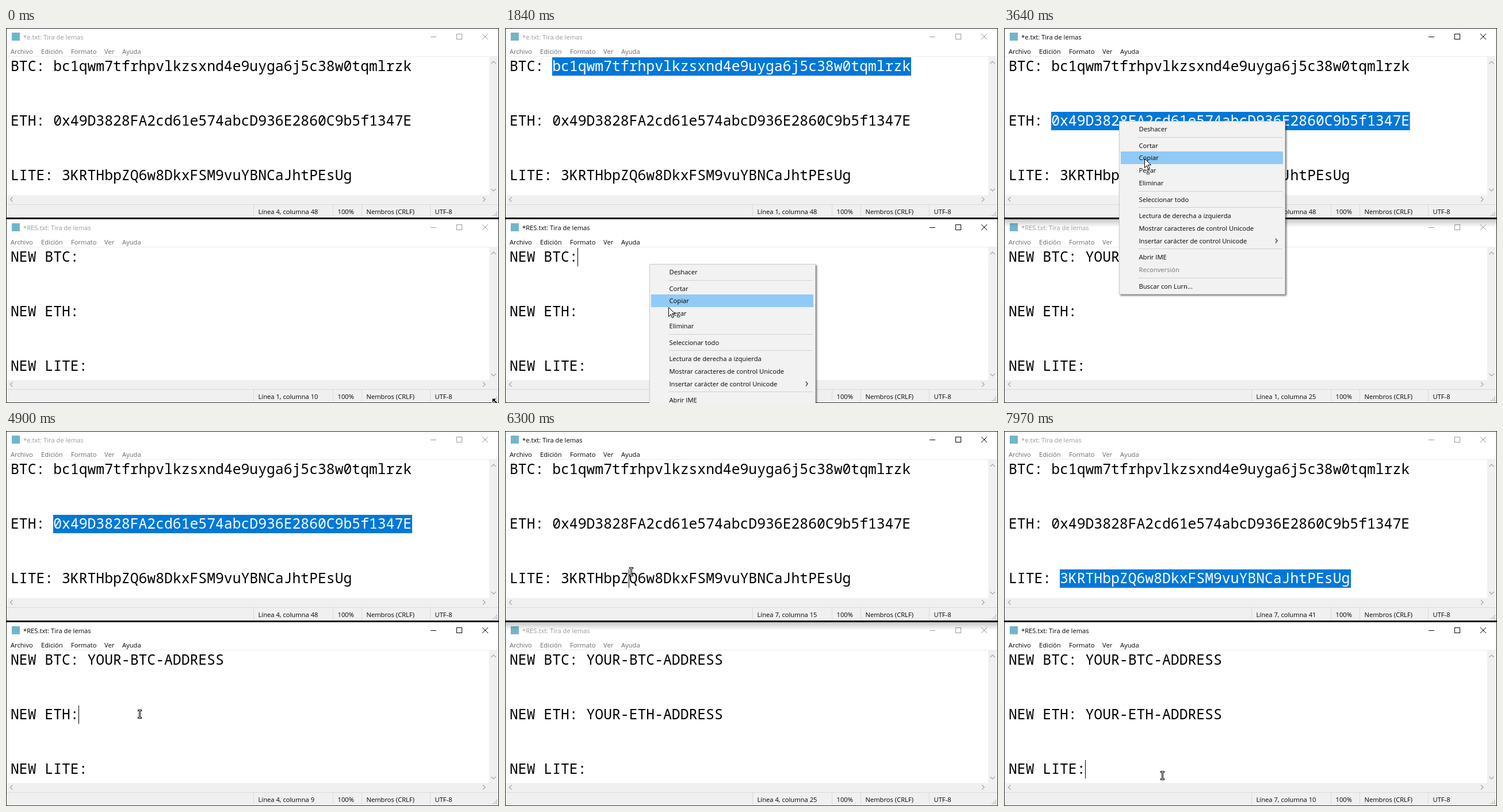
Animation of 857x653 px, one loop 8000 ms. Source, as an HTML page with a canvas:

```html
<!DOCTYPE html>
<html lang="es">
<head>
<meta charset="utf-8">
<style>
html, body { margin: 0; width: 100%; height: 100%; overflow: hidden; background: #fff; }
canvas { display: block; }
</style>
</head>
<body>
<canvas id="stage" width="857" height="653"></canvas>
<script>
const c = document.getElementById('stage').getContext('2d');
const UI = '11.2px "Open Sans", "Noto Sans", sans-serif';
const MONO = '24.73px "Noto Sans Mono", "DejaVu Sans Mono", monospace';
const APP = 'Tira de lemas';
const PITCH = 14.84, LINE = 95 / 3, ROW = 21.7, GAP = 7;
const LOOP = 8000, START = 500;

// One copy-and-paste round per coin: times of its four clicks,
// and where the pointer clicks above, clicks below and opens the paste menu
const rounds = [
  { coin: 'BTC', address: 'bc1qwm7tfrhpvlkzsxnd4e9uyga6j5c38w0tqmlrzk',
    pick: 100, copy: 500, drop: 1170, paste: 2100, from: [176, 67], to: [179, 411], menu: [252, 411] },
  { coin: 'ETH', address: '0x49D3828FA2cd61e574abcD936E2860C9b5f1347E',
    pick: 2570, copy: 3840, drop: 4640, paste: 5700, from: [201, 162], to: [232, 504], menu: [232, 493] },
  { coin: 'LITE', address: '3KRTHbpZQ6w8DkxFSM9vuYBNCaJhtPEsUg',
    pick: 6240, copy: 7240, drop: 7900, paste: 8900, from: [219, 245], to: [275, 600], menu: [275, 600] }
];
const SELECT = 200, OPEN = 400; // delays after a click

const groups = [
  ['Deshacer'],
  ['Cortar', 'Copiar', 'Pegar', 'Eliminar'],
  ['Seleccionar todo'],
  ['Lectura de derecha a izquierda', 'Mostrar caracteres de control Unicode', 'Insertar carácter de control Unicode'],
  ['Abrir IME', 'Reconversión'],
  ['Buscar con Lurn...']
];

const shift = ([x, y], dx, dy) => [x + dx, y + dy];

// Pointer path: click, wait, hover the menu item, travel on
const path = rounds.flatMap(r => {
  const copyItem = shift(r.from, 43, 65), pasteItem = shift(r.menu, 37, 86);
  return [
    [r.pick, r.from], [r.pick + OPEN, r.from],
    [Math.min(r.pick + OPEN + 350, r.copy), copyItem], [r.copy, copyItem],
    [r.drop - 200, r.to], [r.drop, r.to],
    [r.drop + 200, r.menu], [r.drop + OPEN, r.menu],
    [r.drop + OPEN + 350, pasteItem], [r.paste, pasteItem]
  ];
});

function pointerAt(t) {
  const i = path.findIndex(k => k[0] > t);
  const [t0, a] = path[i - 1], [t1, b] = path[i];
  const p = (t - t0) / (t1 - t0), e = p * p * (3 - 2 * p);
  return a.map((v, k) => v + (b[k] - v) * e);
}

function stateAt(t) {
  const i = rounds.findLastIndex(r => t >= r.pick), r = rounds[Math.max(i, 0)];
  if (t < START) return { focus: -1, sel: -1, done: 0, top: [4, 48], low: [1, 10] };
  const dropped = t >= r.drop, chosen = t >= r.pick + SELECT, pasted = t >= r.paste;
  const lowIndex = dropped ? i : Math.max(i - 1, 0), lowDone = dropped ? pasted : i > 0;
  const topCol = chosen ? r.coin.length + 2 + r.address.length : Math.round((r.from[0] - 8) / PITCH);
  const lowCol = rounds[lowIndex].coin.length + 6 + (lowDone ? rounds[lowIndex].coin.length + 13 : 0);
  const menu = t >= r.pick + OPEN && t < r.copy ? { at: r.from, age: t - r.pick - OPEN }
    : t >= r.drop + OPEN && t < r.paste ? { at: r.menu, age: t - r.drop - OPEN } : null;
  return {
    focus: dropped ? 1 : 0, sel: chosen ? i : -1, done: i + pasted, menu,
    top: [1 + 3 * i, topCol + 1], low: [1 + 3 * lowIndex, lowCol + 1 - 1],
    caret: dropped || t < r.copy
  };
}

function rect(x, y, w, h, color) {
  c.fillStyle = color;
  c.fillRect(x, y, w, h);
}

function text(s, x, y, color, font = UI) {
  c.font = font;
  c.fillStyle = color;
  c.fillText(s, x, y);
}

function line(points, color, width = 1) {
  c.beginPath();
  points.forEach(([x, y]) => c.lineTo(x, y));
  c.strokeStyle = color;
  c.lineWidth = width;
  c.stroke();
}

function shape(points, fill, stroke) {
  c.beginPath();
  points.forEach(([x, y]) => c.lineTo(x, y));
  c.closePath();
  c.fillStyle = fill;
  c.strokeStyle = stroke;
  c.lineWidth = 1;
  c.fill();
  c.stroke();
}

function chevron(x, y, dx, dy, color = '#a3a3a3', s = 2) {
  line([[x - s * dx - 4 * dy, y - s * dy - 4 * dx], [x + s * dx, y + s * dy],
        [x - s * dx + 4 * dy, y - s * dy + 4 * dx]], color, 1.2);
}

function drawFrame(y, bottom, name, on, [row, col]) {
  const ink = on ? '#000' : '#999';
  rect(10, y + 8, 14, 14, '#72b5c9');
  text(`*${name}.txt: ${APP}`, 30, y + 20, ink);
  let x = 8;
  for (const s of ['Archivo', 'Edición', 'Formato', 'Ver', 'Ayuda']) {
    text(s, x, y + 45, on ? '#000' : '#6a6a6a');
    x += Math.round(c.measureText(s).width) + 14;
  }
  line([[738, y + 15.5], [748, y + 15.5]], ink);
  c.strokeRect(783.5, y + 10.5, 9, 9);
  line([[828, y + 10], [838, y + 20]], ink);
  line([[838, y + 10], [828, y + 20]], ink);

  rect(1, y + 49, 855, 1, '#ececec');
  rect(840, y + 50, 16, bottom - y - 50, '#f0f0f0');
  rect(1, bottom, 855, 38, '#f0f0f0');
  rect(1, bottom + 16, 855, 1, '#d9d9d9');
  chevron(847.5, y + 60, 0, -1);
  chevron(847.5, bottom - 9, 0, 1);
  chevron(9.5, bottom + 7.5, -1, 0);
  chevron(831, bottom + 7.5, 1, 0);

  const cells = [[430, `Línea ${row}, columna ${col}`], [568, '100%'], [618, 'Nembros (CRLF)'], [737, 'UTF-8']];
  for (const [left, s] of cells) {
    rect(left, bottom + 17, 1, 21, '#d9d9d9');
    text(s, left + 8.5, bottom + 33, '#000');
  }
  for (let i = 0; i < 3; i++)
    for (let j = 0; j <= i; j++) rect(852 - 3 * j, bottom + 29 + 3 * i, 2, 2, '#bfbfbf');
}

function drawCaret(y, [row, col], color) {
  rect(Math.floor(8 + (col - 1) * PITCH), Math.round(y + 51 + (row - 1) * LINE), 1, 32, color);
}

function drawMenu({ at: [mx, my], age }, pointerY) {
  c.save();
  c.globalAlpha = Math.min(1, 0.3 + age / 150);
  c.translate(mx - 1, my);
  c.save();
  c.shadowColor = 'rgba(0,0,0,.55)';
  c.shadowBlur = 3;
  c.shadowOffsetX = c.shadowOffsetY = 2;
  rect(0, 0, 289, 302, '#ccc');
  c.restore();
  rect(1, 1, 287, 300, '#f2f2f2');
  let y = 3;
  groups.forEach((labels, i) => {
    if (i) {
      rect(33, Math.round(y + GAP / 2 - .5), 251, 1, '#d0d0d0');
      y += GAP;
    }
    for (const label of labels) {
      const over = pointerY - my;
      if (over > y && over <= y + ROW) rect(3, Math.round(y), 282, 22, '#91c9f7');
      text(label, 34.5, Math.round(y + 15), label === 'Reconversión' ? '#757575' : '#000');
      if (label.startsWith('Insertar')) chevron(273.5, y + 11, 1, 0, '#222', 1.5);
      y += ROW;
    }
  });
  c.restore();
}

function drawPointer([x, y], arrow) {
  c.save();
  c.translate(Math.round(x) + .5, Math.round(y) + .5);
  if (arrow) {
    shape([[0, 0], [0, 16], [4, 12], [6, 18], [9, 17], [6, 11], [11, 11]], '#fff', '#000');
  } else {
    for (const [w, k, color] of [[3, 3.5, '#000'], [1, 2.5, '#fff']]) {
      line([[0, -7.5], [0, 6.5]], color, w);
      for (const end of [-7, 6]) line([[-k, end], [k, end]], color, w);
    }
  }
  c.restore();
}

function drawResize() {
  shape([[845, 645], [853, 645], [850, 648], [857, 655], [855, 657], [848, 650], [845, 653]], '#000', '#fff');
}

function draw(t) {
  const s = stateAt(t);
  rect(0, 0, 857, 653, '#fff');
  drawFrame(0, 291, 'e', s.focus === 0, s.top);
  drawFrame(332, 613, 'RES', s.focus === 1, s.low);

  rounds.forEach(({ coin, address }, i) => {
    const x = 8 + (coin.length + 2) * PITCH, y = 75 + 95 * i, chosen = s.sel === i;
    if (chosen) rect(Math.round(x), y - 24, Math.round(address.length * PITCH) + 1, 32, '#0078d7');
    text(coin + ':', 8, y, '#000', MONO);
    text(address, x, y, chosen ? '#fff' : '#000', MONO);
    text(`NEW ${coin}: ` + (i < s.done ? `YOUR-${coin}-ADDRESS` : ''), 8, y + 332, '#000', MONO);
  });
  if (s.caret) {
    if (s.focus === 1) drawCaret(332, s.low, '#000');
    else drawCaret(0, s.top, s.sel < 0 ? '#000' : '#ff8728');
  }

  if (s.focus === 0) {
    const shade = c.createLinearGradient(0, 333, 0, 347);
    shade.addColorStop(0, 'rgba(0,0,0,.22)');
    shade.addColorStop(1, 'rgba(0,0,0,0)');
    rect(0, 333, 857, 14, shade);
  }
  rect(0, 330, 857, 3, '#000');
  c.strokeStyle = '#222';
  c.lineWidth = 1;
  c.strokeRect(.5, .5, 856, 652);

  if (t < START) return drawResize();
  const p = pointerAt(t), y = p[1];
  if (s.menu) drawMenu(s.menu, y);
  drawPointer(p, s.menu || y < 50 || (y > 291 && y < 382) || y > 613);
}

function tick(now) {
  draw(now % LOOP);
  requestAnimationFrame(tick);
}
draw(0);
requestAnimationFrame(tick);
</script>
</body>
</html>
```
